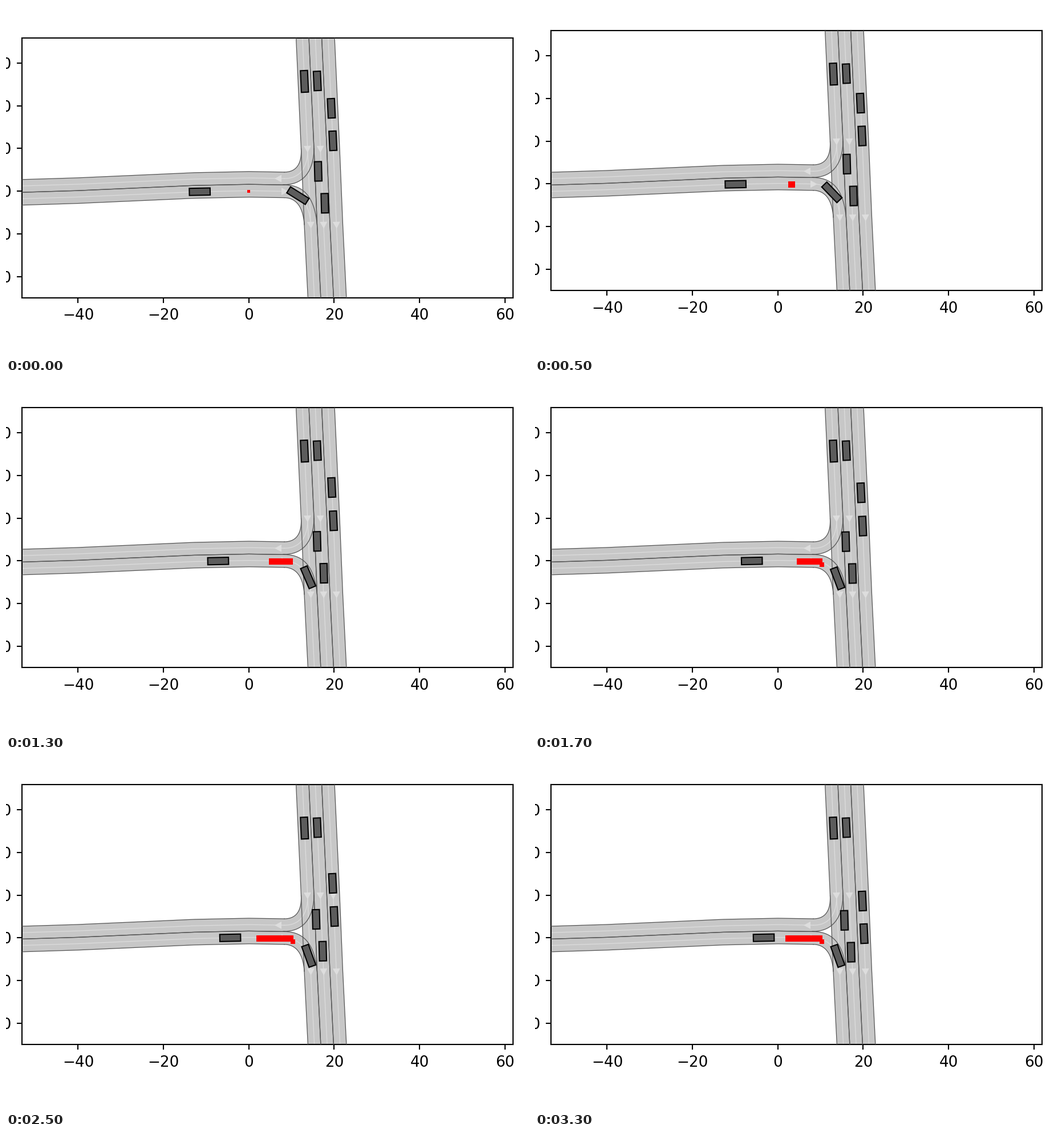
A matplotlib script for the animation above (3.4 s loop, 917 by 611 pixels).

```python
import numpy as np
import matplotlib.pyplot as plt
from matplotlib.animation import FuncAnimation
from matplotlib.patches import Polygon, Rectangle

W, H, DPI = 917, 611, 128
PT = 189 / 72                                         # pixels per typographic point
LEFT, RIGHT, TOP, BOTTOM = 0.03 * W, 0.97 * W, 43.2, 498.2
ORIGIN = np.array([425.8, 311.4])                     # pixel of (0, 0)
SCALE = 7.483                                         # pixels per metre
FIRST_DROP = 12.8                                     # layout offset before the first redraw
FRAMES, INTERVAL = 34, 100
CAR_WIDTH = 12.5


def px(n):
    return n * 72 / DPI


def metres(pts):
    return (np.asarray(pts, float) - ORIGIN) / SCALE * [1, -1]


def unit(angle):
    """Direction in pixel space, y pointing down."""
    a = np.radians(angle)
    return np.array([np.cos(a), np.sin(a)])


def bezier(a, b, c, d):
    t = np.linspace(0, 1, 24)[:, None]
    a, b, c, d = map(np.array, (a, b, c, d))
    return (1 - t) ** 3 * a + 3 * t * (1 - t) ** 2 * b + 3 * t * t * (1 - t) * c + t ** 3 * d


plt.rcParams["font.family"] = "DejaVu Sans"
fig = plt.figure(figsize=(W / DPI, H / DPI), dpi=DPI, facecolor="white")
ax = fig.add_axes([0, 0, 1, 1])
(x0, y1), (x1, y0) = metres([(LEFT, TOP), (RIGHT, BOTTOM)])
ax.set(xlim=(x0, x1), ylim=(y0, y1),
       xticks=range(-40, 61, 20), yticks=range(-20, 31, 10))
ax.tick_params(length=px(3.5 * PT), width=px(0.8 * PT), pad=px(3.5 * PT), labelsize=px(10 * PT))
for spine in ax.spines.values():
    spine.set_linewidth(px(0.8 * PT))


def lane(left, mid, right):
    ax.add_patch(Polygon(metres(np.vstack([left, right[::-1]])), fc="#c7c7c7", ec="none", zorder=1))
    for edge in (left, right):
        ax.plot(*metres(edge).T, color="#555555", lw=px(1.25), zorder=3)
    ax.plot(*metres(mid).T, color="#dddddd", lw=px(1.25), zorder=2)


def arrow(x, y, angle):
    u, v = unit(angle), unit(angle + 90)
    tri = np.array([6.5 * u, 6.5 * v - 5.5 * u, -6.5 * v - 5.5 * u]) + [x, y]
    ax.add_patch(Polygon(metres(tri), fc="#dddddd", ec="none", zorder=4))


# West arm and main road: parallel copies of one line, half a lane apart
arm = np.array([(15, 291.4), (126, 288), (330, 279), (426, 277), (488, 278)])
rows = [arm + [0, 11.2 * i] for i in range(5)]
for i in (0, 2):
    lane(*rows[i:i + 3])

main = np.array([(508, 30), (517.5, 237), (523, 370), (530, 511)])
cols = [main + [11.25 * i, 0] for i in range(7)]
for i in (0, 2, 4):
    lane(*cols[i:i + 3])

# Turns
lane(bezier((517.5, 237), (518.5, 258), (513, 278), (488, 278)),
     bezier((528.8, 237), (529.5, 260), (522, 289.5), (488, 289.2)),
     bezier((540, 237), (540, 262), (531, 301), (486, 300)))
lane(bezier((488, 300.4), (523, 300.5), (541, 323), (545.5, 370)),
     bezier((488, 311.6), (516, 312), (532, 332), (534.3, 370)),
     bezier((488, 322.8), (508, 323), (521, 338), (523, 370)))

for i in range(3):
    arrow(528.7 + 22.5 * i, 237.5, 88)
    arrow(534.5 + 22.5 * i, 370.5, 88)
arrow(477.5, 289.3, 180)
arrow(488.5, 311.8, 0)


def cruise(x, y, heading, speed=0, accel=0):
    """Straight drive along the heading."""
    return lambda t: (np.array([x, y]) + unit(heading) * (speed * t + accel * t * t / 2), heading)


def creep(x, y):
    """Slow sideways drift of a car that is just setting off."""
    return lambda t: (np.array([x - 0.15 * t, y + 0.0039 * t * t]), 88.5)


def turn(x, y, heading, speed, reach, bend):
    """Circular arc at steady speed that comes to rest after `reach` pixels."""
    def pose(t):
        s = speed * t / (1 + (speed * t / reach) ** 5) ** 0.2
        a, b = np.radians([heading, heading + bend * s])
        arc = np.array([np.sin(b) - np.sin(a), np.cos(a) - np.cos(b)])
        return np.array([x, y]) + arc / np.radians(bend), heading + bend * s
    return pose


# Pose rule and length of each car
CARS = [
    (cruise(339.7, 312.3, -1.1, 3.15, -0.077), 36.5),
    (turn(511.8, 319.2, 32, 2.8, 31, 1.24), 38.3),
    (cruise(523.3, 119.2, 87.5), 38),
    (cruise(545.8, 118.4, 87.5), 33.8),
    (cruise(570.4, 166.3, 87.4, 0.713, 0.113), 34),
    (cruise(573.2, 223.2, 87.4, 0.881, 0.103), 34),
    (creep(547.3, 276.7), 34),
    (creep(559, 332.5), 34),
]

cars = [ax.add_patch(Polygon(np.zeros((4, 2)), fc="#5c5c5c", ec="black", lw=px(0.8 * PT),
                             joinstyle="miter", zorder=6)) for _ in CARS]
body, step = (ax.add_patch(Rectangle((0, 0), 0, 0, fc="red", ec="none", zorder=8)) for _ in range(2))


def place(patch, left, right, top, bottom):
    (a, d), (c, b) = metres([(left, top), (right, bottom)])
    patch.set_bounds(a, b, c - a, d - b)


def draw_reach(t):
    """Stretch of lane that can be reached: it grows, then stops at the bend."""
    half = min(2.5 + 0.9 * t, 5.9)
    rear = 423.3 + max(6 * t - 0.236 * t * t, min(6 * t, 16))
    front = 428.3 + min(7.4 * t - 0.095 * t * t, 79)
    place(body, rear, min(front, 504), 311.4 + 0.17 * half - half, 311.4 + 0.17 * half + half)
    place(step, 499, front, 314, 322)
    step.set_visible(front > 504)


def update(n):
    drop = FIRST_DROP if n == 0 else 0
    ax.set_position([LEFT / W, 1 - (BOTTOM + drop) / H, (RIGHT - LEFT) / W, (BOTTOM - TOP) / H])
    t = max(n - 1, 0)
    for patch, (pose, length) in zip(cars, CARS):
        c, heading = pose(t)
        u, v = unit(heading) * length / 2, unit(heading + 90) * CAR_WIDTH / 2
        patch.set_xy(metres([c + u + v, c + u - v, c - u - v, c - u + v]))
    draw_reach(t)
    return cars + [body, step]


anim = FuncAnimation(fig, update, frames=FRAMES, interval=INTERVAL,
                     init_func=lambda: update(0), repeat=True, repeat_delay=0, blit=False)
plt.show()
```
